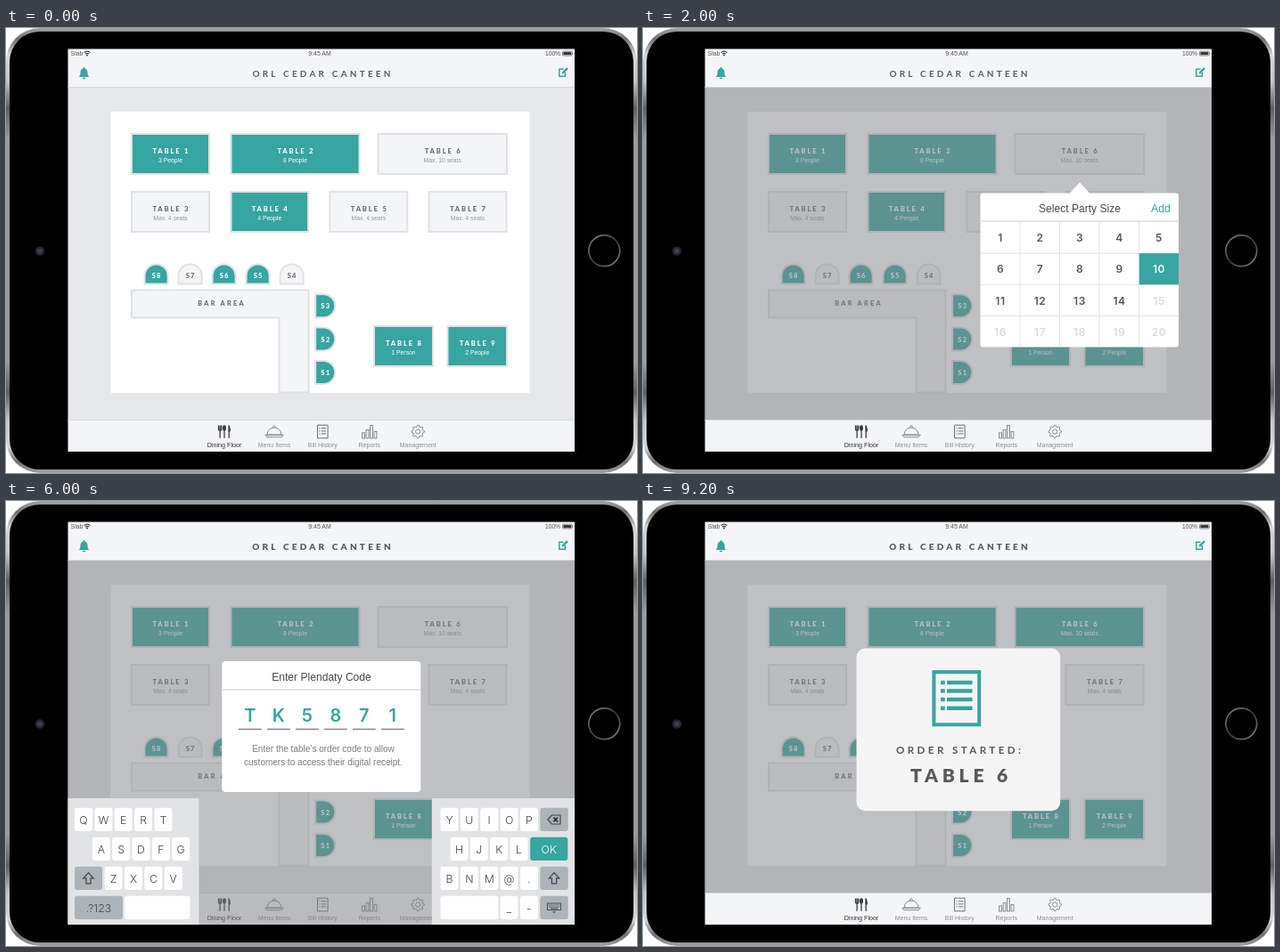
An HTML page that plays this animation: 708 px wide and 500 px high, repeating every 10 s.

```html
<!DOCTYPE html>
<html lang="en">
<head>
<meta charset="utf-8">
<title>Table ordering</title>
<style>
  html, body { margin: 0; width: 100%; height: 100%; overflow: hidden; background: #fff; }
  svg { display: block; position: absolute; left: 0; top: 0; }
  text { font-family: "Liberation Sans", Arial, sans-serif; text-anchor: middle; }
  .caps { font-family: Lato, sans-serif; font-weight: 800; }
  .num { font-family: Inter, sans-serif; font-weight: 600; }
  .key { font-family: Inter, sans-serif; font-weight: 300; font-size: 12.3px; }
  .line { fill: none; stroke: #88898b; stroke-width: 1; }
</style>
</head>
<body>
<svg id="stage" width="708" height="500" viewBox="0 0 708 500"></svg>
<script>
const TEAL = '#37a5a0', PALE = '#f4f5f7', EDGE = '#e0e2e4', GREY = '#68696c';
const STEP = 2000, COUNT = 5;

const rect = (x, y, x2, y2, fill, more = '') =>
  `<rect x="${x}" y="${y}" width="${x2 - x}" height="${y2 - y}" fill="${fill}" ${more}/>`;
const path = (d, more = '') => `<path d="${d}" ${more}/>`;
const group = (body, more = '') => `<g ${more}>${body}</g>`;
const at = (x, y, body) => group(body, `transform="translate(${x} ${y})"`);
const text = (s, x, y, size, fill, more = '') =>
  `<text x="${x}" y="${y}" font-size="${size}" fill="${fill}" ${more}>${s}</text>`;
// Half the tracking is added so the spaced line stays centred.
const caps = (s, x, y, size, gap, fill, more = '') =>
  text(s, x + gap / 2, y, size, fill, `class="caps" letter-spacing="${gap}" ${more}`);
// Content shown only in the listed scenes.
const only = (scenes, body) => group(body, `data-scenes="${scenes}"`);

function device() {
  const stops = [[0, '#a4a4a4'], [.025, '#6f6f6f'], [.06, '#d8d8d8'], [.12, '#c4c4c4'], [.18, '#5f5f5f'],
    [.25, '#9c9c9c'], [.75, '#9c9c9c'], [.82, '#5f5f5f'], [.88, '#c4c4c4'], [.94, '#d8d8d8'],
    [.975, '#6f6f6f'], [1, '#a4a4a4']];
  const metal = stops.map(([o, c]) => `<stop offset="${o}" stop-color="${c}"/>`).join('');
  return `<defs><linearGradient id="metal" x2="0" y2="1">${metal}</linearGradient>
    <linearGradient id="ring" x2="1" y2="1"><stop stop-color="#8a8a8a"/><stop offset=".5" stop-color="#3a3a3a"/>
    <stop offset="1" stop-color="#858585"/></linearGradient></defs>` +
    rect(0, 0, 708, 500, 'url(#metal)', 'rx="38"') +
    rect(4, 4, 704, 496, '#000', 'rx="34"') +
    '<circle cx="38" cy="250.5" r="5.2" fill="#25262b"/><circle cx="38" cy="250.5" r="2.8" fill="#3a4058"/>' +
    '<circle cx="671.3" cy="250.3" r="17.4" fill="#000" stroke="url(#ring)" stroke-width="1.7"/>';
}

function header() {
  const bell = path('M0-7a1.3 1.3 0 0 1 1.2 1.4C3.3-5 4-3.3 4-1.2C4 1.4 4.4 2.6 5.4 3.4V4.1H-5.4V3.4C-4.4 2.6-4 1.4-4-1.2C-4-3.3-3.3-5-1.2-5.6A1.3 1.3 0 0 1 0-7zM-1.8 4.8H1.8A1.8 1.5 0 0 1-1.8 4.8z', `fill="${TEAL}"`);
  const edit = path('M627.5 50v4.2h-6.7v-7.9h4.7', `fill="none" stroke="${TEAL}" stroke-width="1.5"`) +
    path('M623.6 51.6l.6-2.3 5-5 1.7 1.7-5 5z', `fill="${TEAL}"`);
  const wifi = path('M87.6 27.6a4.8 4.8 0 0 1 6.8 0M89 29.2a2.8 2.8 0 0 1 4 0', 'fill="none" stroke="#444" stroke-width="1.2"') +
    '<circle cx="91" cy="30.6" r="1" fill="#444"/>';
  const battery = rect(624.5, 26.2, 635, 31, 'none', 'rx="1" stroke="#555" stroke-width=".7"') +
    rect(625.4, 27.1, 634.1, 30.1, '#333') + rect(635.4, 27.6, 636.2, 29.6, '#555');
  const title = weight => caps('ORL CEDAR CANTEEN', 354, 55, 10, 3.2, '#5c5d60', `style="font-weight:${weight}"`);
  return rect(69.5, 23.5, 638, 67, PALE) + rect(69.5, 66, 638, 67, '#d5d7d9') +
    text('Slab', 79.5, 31, 7, '#555') + wifi + text('9:45 AM', 352, 31, 7, '#555') +
    text('100%', 613.5, 31, 6.7, '#555') + battery + at(87.5, 51, bell) + edit +
    only('0 1', title(700)) + only('2 3 4', title(900));
}

function table(n, x, x2, y, note, taken) {
  const cx = (x + x2) / 2;
  return rect(x + 1, y + 1, x2 - 1, y + 46, taken ? TEAL : PALE, `stroke="${EDGE}" stroke-width="2"`) +
    caps('TABLE ' + n, cx, y + 23, 7.7, 1.8, taken ? '#fff' : GREY) +
    text(note, cx, y + 33, 6.8, taken ? '#fff' : '#96979a');
}

function stool(n, x, y, turn, taken) {
  const shape = path('M-13 11V2A13 13 0 0 1 13 2V11z',
    `transform="rotate(${turn})" fill="${taken ? TEAL : PALE}" stroke="${EDGE}" stroke-width="2"`);
  return at(x, y, shape + caps('S' + n, 0, turn ? 3 : 4.5, 7.6, 1.2, taken ? '#fff' : GREY));
}

function floor() {
  const tables = [
    [1, 140, 229, 118, '3 People', 1], [2, 251.5, 397.5, 118, '8 People', 1],
    [3, 140, 229, 183, 'Max. 4 seats'], [4, 251.5, 340, 183, '4 People', 1],
    [5, 362.3, 451.3, 183, 'Max. 4 seats'], [7, 473.5, 562.5, 183, 'Max. 4 seats'],
    [8, 412, 480, 334, '1 Person', 1], [9, 494.5, 563, 334, '2 People', 1]
  ];
  const free = [4, 7];
  const top = [8, 7, 6, 5, 4].map((n, i) => stool(n, 168.6 + 38 * i, 276.5, 0, !free.includes(n)));
  const side = [3, 2, 1].map((n, i) => stool(n, 358.2, 312.3 + 37.3 * i, 90, true));
  const six = taken => table(6, 416.5, 563, 118, 'Max. 10 seats', taken);
  return rect(69.5, 67, 638, 440, '#e6e7e8') + rect(117.5, 94, 587.5, 410, '#fff') +
    tables.map(t => table(...t)).join('') +
    only('0 1 2 3', six(false)) + only('4', six(true)) +
    path('M141 294.5H339.5V409.5H306.5V325.5H141z', `fill="${PALE}" stroke="${EDGE}" stroke-width="2"`) +
    caps('BAR AREA', 241, 312, 7.3, 2.3, GREY) + top.join('') + side.join('');
}

function gear() {
  const points = [];
  for (let i = 0; i < 32; i++) {
    const a = (i - .5) * Math.PI / 16, r = i % 4 < 2 ? 7.2 : 5.5;
    points.push((r * Math.cos(a)).toFixed(2) + ',' + (r * Math.sin(a)).toFixed(2));
  }
  return `<polygon class="line" points="${points.join(' ')}"/><circle class="line" r="2.6"/>`;
}

function tabs() {
  const cutlery = path('M-6.5-7v4.2q0 1.6 1.6 1.6T-3.3-2.8V-7M-4.9-7V7.3M0-2V7.3M5.2-7V7.3', 'fill="none" stroke="#3c3c3e" stroke-width="1.3"') +
    '<ellipse cy="-4" rx="2" ry="3.3" fill="#3c3c3e"/>' + path('M4.6-7.3Q7.4-5 6.8 0H4.6z', 'fill="#3c3c3e"');
  const dome = path('M-8 3.5A8 8 0 0 1 8 3.5zM-10.2 3.8H10.2L8.4 6.2H-8.4zM-1.2-4.8a1.3 1.3 0 1 1 2.4 0', 'class="line"');
  const bill = path('M-5.8-7.3H5.8V7.3H-5.8zM-1.6-3.8H4M-1.6-.6H4M-1.6 2.4H4M-4-3.8h1.2M-4-.6h1.2M-4 2.4h1.2', 'class="line" style="stroke:#6f7072"');
  const bars = [6, 9.5, 14.5, 7.5].map((h, i) =>
    rect(-8.2 + 4.5 * i, 7.4 - h, -5.4 + 4.5 * i, 7.4, 'none', 'class="line"')).join('');
  const items = [['Dining Floor', 245, cutlery], ['Menu Items', 301, dome], ['Bill History', 355.3, bill],
    ['Reports', 407.8, bars], ['Management', 462.2, gear()]];
  return rect(69.5, 440, 638, 476, PALE) + rect(69.5, 440, 638, 441, '#d8dadc') +
    items.map(([name, x, icon], i) =>
      at(x, 453.5, icon) + text(name, x, 471, i ? 7 : 7.2, i ? '#8d8e90' : '#333')).join('');
}

function picker() {
  const x = 378.5, y = 218, w = 44.5, h = 35.15, cells = [];
  for (let n = 1; n <= 20; n++) {
    const cx = x + w * ((n - 1) % 5), cy = y + h * Math.floor((n - 1) / 5), on = n === 10;
    if (on) cells.push(rect(cx + .3, cy, 601, cy + h, TEAL));
    cells.push(text(n, cx + w / 2 + .3, cy + 22.3, 12, on ? '#fff' : n > 14 ? '#dadbdc' : '#58595b', 'class="num" letter-spacing=".6"'));
  }
  let grid = '';
  for (let i = 1; i < 5; i++) grid += `M${x + w * i} ${y}V358.5`;
  for (let i = 1; i < 4; i++) grid += `M${x} ${y + h * i}H601`;
  return rect(x, 185.5, 601, 358.5, '#fff', 'rx="3"') + path('M478 186.5L490 173.5L502 186.5z', 'fill="#fff"') +
    text('Select Party Size', 490, 207, 12.1, '#4a4a4c') + text('Add', 581, 207, 12.3, TEAL) +
    rect(x, 216.3, 601, 218, '#dfe0e2') + path(grid, 'stroke="#e3e4e6"') + cells.join('');
}

function codeBox() {
  const code = [...'TK5871'];
  return rect(242.3, 180, 465.3, 327, '#fff', 'rx="4"') +
    text('Enter Plendaty Code', 354, 202, 12.1, '#4a4a4c') + rect(242.3, 211.2, 465.3, 212.8, '#dfe0e2') +
    code.map((c, i) => rect(261 + 32 * i, 255.7, 286.8 + 32 * i, 257.2, '#858688')).join('') +
    only('3', code.map((c, i) => text(c, 273.8 + 32 * i, 248.3, 20, TEAL, 'class="num"')).join('')) +
    text('Enter the table’s order code to allow', 356, 282, 10.03, '#7c7d80') +
    text('customers to access their digital receipt.', 356, 297, 10, '#7c7d80');
}

function keyboard() {
  const key = (x, x2, row, label, fill = '#fff', ink = '#444') => {
    const y = 344.8 + 33 * row;
    return rect(x, y, x2, y + 26.3, fill, 'rx="3"') +
      text(label, (x + x2) / 2, y + 17.8, '', ink, 'class="key"');
  };
  const run = (x, row, letters) =>
    [...letters].map((c, i) => key(x + 22.35 * i, x + 22.35 * i + 20, row, c)).join('');
  const DARK = '#adb4b9', pen = 'fill="none" stroke="#444" stroke-width="1.2"';
  const arrow = path('M0-6.3L5.7-.2H2.6V5.8H-2.6V-.2H-5.7z', pen);
  const erase = path('M-7 0L-2.6-5H7V5H-2.6z', pen) + path('M-.6-2.3L4 2.3M4-2.3L-.6 2.3', 'stroke="#333" stroke-width="1.9"');
  const hide = rect(-7.5, -5, 7.5, 2.5, 'none', 'stroke="#444" stroke-width=".9"') +
    path('M-6-3H6M-6-1H6', 'stroke="#444" stroke-width="1.1" stroke-dasharray="1.2 .9"') +
    path('M-4 .9H4', 'stroke="#444"') + path('M-2 4.3H2L0 6z', 'fill="#444"');
  return rect(69.5, 334, 216.5, 476, '#e2e3e4') + rect(477.8, 334, 638, 476, '#e2e3e4') +
    run(77, 0, 'QWERT') + run(96.8, 1, 'ASDFG') + key(77, 108, 2, '', DARK) + run(110.7, 2, 'ZXCV') +
    key(77, 131, 3, '.?123', DARK) + key(133, 206.5, 3, '') +
    run(487.5, 0, 'YUIOP') + key(599.3, 630.8, 0, '', DARK) +
    run(498.5, 1, 'HJKL') + key(588.2, 630.3, 1, 'OK', TEAL, '#fff') +
    run(487.5, 2, 'BNM@.') + key(599.3, 630.8, 2, '', DARK) +
    key(487.5, 552.3, 3, '') + run(554.5, 3, '_-') + key(599.3, 630.8, 3, '', DARK) +
    at(92.5, 424, arrow) + at(615, 424, arrow) + at(615, 358, erase) + at(615, 457, hide);
}

function notice() {
  const rows = [204, 213.4, 223, 232.8].map(y =>
    rect(334, y - 2.2, 338.8, y + 2.2, TEAL) + rect(341, y - 2.2, 369.5, y + 2.2, TEAL)).join('');
  return rect(239.5, 165.5, 468.2, 348.2, '#f4f4f4', 'rx="10"') +
    rect(326.4, 192.1, 377.2, 251.3, 'none', `stroke="${TEAL}" stroke-width="4"`) + rows +
    caps('ORDER STARTED:', 354, 284, 11.6, 3.4, '#58595b', 'style="font-weight:700"') +
    caps('TABLE 6', 354.5, 315.5, 21, 4.8, '#58595b', 'style="font-weight:900"');
}

const shade = bottom => rect(69.5, 67, 638, bottom, '#808183', 'fill-opacity=".5"');

const stage = document.getElementById('stage');
stage.innerHTML = device() + floor() + tabs() + header() +
  only('1 4', shade(440)) + only('2 3', shade(476)) +
  only('1', picker()) + only('2 3', codeBox() + keyboard()) + only('4', notice());

const layers = [...stage.querySelectorAll('[data-scenes]')].map(node =>
  ({ node, scenes: node.dataset.scenes.split(' ').map(Number) }));
const start = performance.now();
let shown = -1;

function draw(now) {
  const scene = Math.floor(Math.max(0, now - start) / STEP) % COUNT;
  if (scene !== shown) {
    shown = scene;
    for (const { node, scenes } of layers) node.style.display = scenes.includes(scene) ? '' : 'none';
  }
  requestAnimationFrame(draw);
}
draw(start);
</script>
</body>
</html>
```
